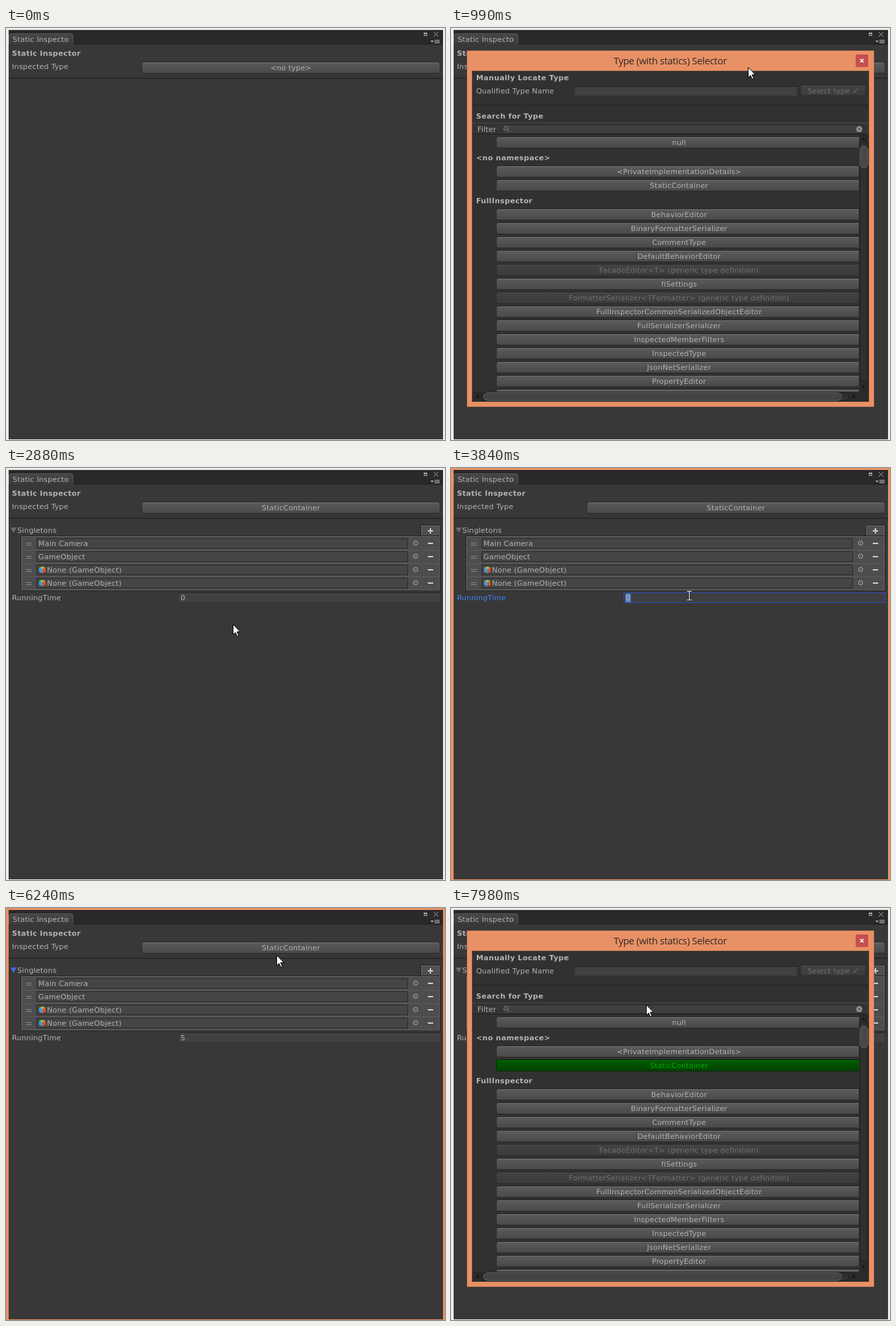
Recreate the animation shown at these times as an HTML page with a canvas. Size 664 by 623 pixels, loop 8000 ms.

```html
<!DOCTYPE html>
<html lang="en">
<head>
<meta charset="utf-8">
<title>Static Inspector</title>
<style>
html, body { margin: 0; width: 100%; height: 100%; overflow: hidden; background: #383838; }
canvas { display: block; }
</style>
</head>
<body>
<canvas id="stage" width="664" height="623"></canvas>
<script>
const g = document.getElementById('stage').getContext('2d');
const LOOP = 8000, STEP = 30;
const ORANGE = '#e99166', TEXT = '#b4b4b4';

// Cursor moves: start, end, then from and to
const MOVES = [
  [240, 630, 664, 33, 449, 59],
  [1410, 1950, 449, 59, 343, 237],
  [2880, 2880, 343, 237, 343, 236],
  [3090, 3780, 343, 236, 361, 193],
  [4290, 4560, 361, 193, 341, 240],
  [5790, 6390, 341, 240, 414, 60],
  [7020, 7440, 414, 60, 342, 103],
  [7590, 7770, 342, 103, 296, 144],
  [7950, 7980, 296, 144, 295, 146]
];

const TYPES = ['BehaviorEditor', 'BinaryFormatterSerializer', 'CommentType',
  'DefaultBehaviorEditor', 'FacadeEditor<T> (generic type definition)', 'fiSettings',
  'FormatterSerializer<TFormatter> (generic type definition)',
  'FullInspectorCommonSerializedObjectEditor', 'FullSerializerSerializer',
  'InspectedMemberFilters', 'InspectedType', 'JsonNetSerializer', 'PropertyEditor', ''];

const within = (t, a, b) => t >= a && t < b;

function rect(x, y, w, h, fill) {
  g.fillStyle = fill;
  g.fillRect(x, y, w, h);
}

function frame(x, y, w, h, color) {
  g.strokeStyle = color;
  g.lineWidth = 1;
  g.strokeRect(x + .5, y + .5, w - 1, h - 1);
}

function round(x, y, w, h, r, fill, stroke) {
  g.beginPath();
  g.roundRect(x + .5, y + .5, w - 1, h - 1, r);
  g.fillStyle = fill;
  g.fill();
  if (stroke) {
    g.strokeStyle = stroke;
    g.lineWidth = 1;
    g.stroke();
  }
}

function poly(points, fill, stroke) {
  g.beginPath();
  for (let i = 0; i < points.length; i += 2) g.lineTo(points[i], points[i + 1]);
  g.closePath();
  g.fillStyle = fill;
  g.fill();
  if (stroke) {
    g.strokeStyle = stroke;
    g.lineWidth = 1;
    g.stroke();
  }
}

function fade(y, h, top, bottom) {
  const grad = g.createLinearGradient(0, y, 0, y + h);
  grad.addColorStop(0, top);
  grad.addColorStop(1, bottom);
  return grad;
}

function text(s, x, y, { color = TEXT, bold = false, align = 'left' } = {}) {
  g.font = (bold ? 'bold ' : '') + '11px "DejaVu Sans", sans-serif';
  g.letterSpacing = bold ? '.34px' : '.21px';
  g.textAlign = align;
  g.fillStyle = color;
  g.fillText(s, x, y + 4);
  g.letterSpacing = '0px';
}

function button(x, y, w, h, label, mode = 'normal') {
  const [top, bottom, edge, shine, color] = {
    normal: ['#5c5c5c', '#484848', '#292929', '#727272', TEXT],
    pressed: ['#585858', '#555555', '#292929', '#5c5c5c', TEXT],
    disabled: ['#434343', '#3a3a3a', '#2c2c2c', '#4a4a4a', '#727272'],
    chosen: ['#005c00', '#004300', '#002600', '#007000', '#00b000']
  }[mode];
  round(x, y, w, h, 3, fade(y, h, top, bottom), edge);
  rect(x + 3, y + 1, w - 6, 1, shine);
  text(label, x + w / 2, y + h / 2, { color, align: 'center' });
}

function field(x, y, w, h) {
  rect(x, y, w, h, '#414141');
  rect(x, y, w, 1, '#2a2a2a');
  frame(x, y, w, h, 'rgba(30,30,30,.35)');
}

function drawWindow(t) {
  const focused = within(t, 840, 900) || within(t, 3810, 6690);
  rect(0, 0, 664, 623, focused ? ORANGE : '#ececec');
  rect(4, 3, 657, 619, '#383838');
  rect(4, 3, 657, 22, '#292929');
  rect(4, 24, 657, 1, '#202020');
  round(4, 8, 98, 20, 3, fade(8, 18, '#484848', '#383838'), '#525252');
  rect(4, 25, 657, 4, '#383838');
  text('Static Inspecto', 10, 17);

  frame(632, 7, 5, 5, '#b0b0b0');
  rect(632, 7, 5, 2, '#b0b0b0');
  g.beginPath();
  g.moveTo(647, 6); g.lineTo(654, 13);
  g.moveTo(654, 6); g.lineTo(647, 13);
  g.strokeStyle = '#a0a0a0';
  g.stroke();
  poly([642, 19, 647, 19, 644.5, 22], '#b0b0b0');
  for (const y of [18, 20, 22]) rect(648, y, 8, 1, '#b0b0b0');

  const loaded = t >= 2220;
  text('Static Inspector', 9, 38, { bold: true });
  text('Inspected Type', 9, 58);
  button(205, 51, 452, 18, loaded ? 'StaticContainer' : '<no type>');
  rect(4, 75, 657, 2, '#292929');
  if (loaded) drawStatics(t);
}

function drawStatics(t) {
  const foldFocus = within(t, 5430, 6690);
  poly([7, 90, 16, 90, 11.5, 98], foldFocus ? '#4468e8' : '#6c6c6c');
  text('Singletons', 17, 94);

  rect(628, 87, 28, 17, '#505050');
  frame(628, 87, 28, 17, '#6a6a6a');
  frame(627, 86, 30, 18, '#242424');
  rect(638, 94, 8, 2, '#d0d0d0');
  rect(641, 91, 2, 8, '#d0d0d0');

  rect(22, 102, 635, 84, '#242424');
  rect(23, 103, 633, 82, '#4d4d4d');
  frame(23, 103, 633, 82, '#646464');
  const names = ['Main Camera', 'GameObject', 'None (GameObject)', 'None (GameObject)'];
  names.forEach((name, i) => {
    const y = 114 + i * 20, empty = i > 1;
    if (i) rect(24, y - 10, 631, 1, '#5c5c5c');
    for (const dy of [-1, 2]) rect(30, y + dy, 9, 1, '#8a8a8a');
    rect(46, y - 8, 562, 16, '#454545');
    frame(46, y - 8, 562, 16, '#292929');
    if (empty) cube(55, y);
    text(name, empty ? 62 : 49, y);
    g.beginPath();
    g.arc(619.5, y - .5, 3.2, 0, 7);
    g.strokeStyle = '#b4b4b4';
    g.stroke();
    rect(619, y - 1, 1, 1, '#d0d0d0');
    rect(638, y - 1, 8, 2, '#d0d0d0');
  });

  const editing = within(t, 3840, 5430), typed = t >= 4590;
  text('RunningTime', 9, 196, { color: editing ? '#4080f8' : TEXT });
  field(261, 188, 396, 16);
  if (editing) {
    rect(261, 188, 397, 16, '#3f3f42');
    frame(261, 188, 397, 16, '#294fb4');
    if (!typed) rect(264, 190, 8, 13, '#5484c4');
    else rect(272, 190, 1, 12, TEXT);
  }
  text(typed ? '5' : '0', 264, 196);
}

function cube(x, y) {
  poly([x - 5, y - 3, x, y - 5, x + 5, y - 3, x, y - 1], '#98c848');
  poly([x - 5, y - 3, x, y - 1, x, y + 5, x - 5, y + 3], '#3c9ce0');
  poly([x + 5, y - 3, x, y - 1, x, y + 5, x + 5, y + 3], '#e0502c');
}

function drawPopup(t) {
  rect(24, 34, 616, 539, ORANGE);
  frame(24, 34, 616, 539, '#c47850');
  rect(31, 64, 602, 502, '#c87c54');
  rect(32, 65, 600, 500, '#ffffff');
  g.font = '14.5px "Open Sans", sans-serif';
  g.textAlign = 'center';
  g.fillStyle = '#302620';
  g.letterSpacing = '-.25px';
  g.fillText('Type (with statics) Selector', 331.5, 55);
  g.letterSpacing = '0px';
  rect(612, 40, 19, 19, '#c75050');
  g.beginPath();
  g.moveTo(619, 47); g.lineTo(624, 52);
  g.moveTo(624, 47); g.lineTo(619, 52);
  g.strokeStyle = '#fff';
  g.lineWidth = 1.6;
  g.stroke();
  if (within(t, 990, 2220) || t >= 6870) drawSelector(t);
}

function drawSelector(t) {
  rect(32, 65, 600, 500, '#313131');
  text('Manually Locate Type', 38, 75, { bold: true });
  text('Qualified Type Name', 38, 95);
  field(187, 88, 337, 15);
  button(528, 86, 100, 17, 'Select type ✓', 'disabled');
  rect(32, 116, 600, 2, '#282828');
  text('Search for Type', 38, 133, { bold: true });

  rect(32, 144, 600, 17, '#353535');
  rect(32, 143, 600, 1, '#484848');
  rect(32, 160, 600, 1, '#202020');
  text('Filter', 40, 153);
  round(76, 146, 549, 14, 7, '#404040', '#282828');
  g.strokeStyle = '#858585';
  g.lineWidth = 1;
  g.beginPath();
  g.arc(83, 151.5, 2.8, 0, 7);
  g.moveTo(85, 154); g.lineTo(88, 157);
  g.stroke();
  g.beginPath();
  g.arc(617.5, 153, 4.5, 0, 7);
  g.fillStyle = '#949494';
  g.fill();
  g.beginPath();
  g.moveTo(616, 151.5); g.lineTo(619, 154.5);
  g.moveTo(619, 151.5); g.lineTo(616, 154.5);
  g.strokeStyle = '#303030';
  g.stroke();

  g.save();
  g.beginPath();
  g.rect(32, 161, 585, 389);
  g.clip();
  const item = (name, y, mode) => button(68, y - 9, 554, 18, name, mode);
  const own = t >= 6870 ? 'chosen' : t >= 2160 ? 'pressed' : 'normal';
  item('null', 173);
  text('<no namespace>', 38, 196, { bold: true });
  item('<PrivateImplementationDetails>', 217);
  item('StaticContainer', 238, own);
  text('FullInspector', 38, 261, { bold: true });
  TYPES.forEach((name, i) =>
    item(name, 282 + i * 21, name.includes('generic') ? 'disabled' : 'normal'));
  g.restore();

  rect(617, 161, 15, 389, '#2a2a2a');
  round(618, 172, 13, 362, 6, '#303030', '#1e1e1e');
  round(618, 178, 13, 34, 6, '#484848', '#606060');
  poly([621, 170, 627, 170, 624, 166], '#141414');
  poly([621, 541, 627, 541, 624, 545], '#141414');
  rect(32, 550, 600, 15, '#2a2a2a');
  round(46, 551, 556, 13, 6, '#303030', '#1e1e1e');
  round(49, 551, 542, 13, 6, '#444444', '#5c5c5c');
  poly([42, 554, 42, 560, 38, 557], '#141414');
  poly([608, 554, 608, 560, 612, 557], '#141414');
}

function cursorAt(t) {
  const [a, b, x0, y0, x1, y1] = MOVES.findLast(m => m[0] <= t);
  const p = b > a ? Math.min(1, (t - a) / (b - a)) : 1;
  const k = 1 - (1 - p) ** 2;
  return [Math.round(x0 + (x1 - x0) * k), Math.round(y0 + (y1 - y0) * k)];
}

function overField(t, x, y) {
  if (within(t, 2220, 6660)) return x >= 261 && within(y, 188, 205);
  if (!within(t, 990, 2220) && t < 6870) return false;
  return within(x, 187, 524) && within(y, 88, 104) || within(x, 90, 612) && within(y, 147, 160);
}

function drawCursor(t) {
  if (t < 240) return;
  const [x, y] = cursorAt(t);
  g.save();
  g.translate(x, y);
  if (overField(t, x, y)) {
    for (const [grow, color] of [[1, '#303030'], [0, '#e8e8e8']]) {
      rect(-1 - grow / 2, -7 - grow, 1 + grow, 14 + 2 * grow, color);
      rect(-4, -7 - grow, 7, 1 + grow, color);
      rect(-4, 6, 7, 1 + grow, color);
    }
  } else {
    poly([.5, .5, .5, 16, 4, 12.7, 6.7, 18.5, 9, 17.5, 6.4, 11.7, 11.3, 11.7], '#fff', '#000');
  }
  g.restore();
}

function popupAlpha(t) {
  if (within(t, 900, 2220) || t >= 6780) return 1;
  return t >= 6720 ? .8 : t >= 6690 ? .4 : 0;
}

function draw(now) {
  const t = Math.floor((now % LOOP) / STEP) * STEP;
  drawWindow(t);
  const alpha = popupAlpha(t);
  if (alpha) {
    const scale = .9 + .1 * alpha;
    g.save();
    g.globalAlpha = alpha;
    g.translate(332, 303);
    g.scale(scale, scale);
    g.translate(-332, -303);
    drawPopup(t);
    g.restore();
  }
  drawCursor(t);
}

let start;
function tick(now) {
  start ??= now;
  draw(now - start);
  requestAnimationFrame(tick);
}
draw(0);
requestAnimationFrame(tick);
</script>
</body>
</html>
```
